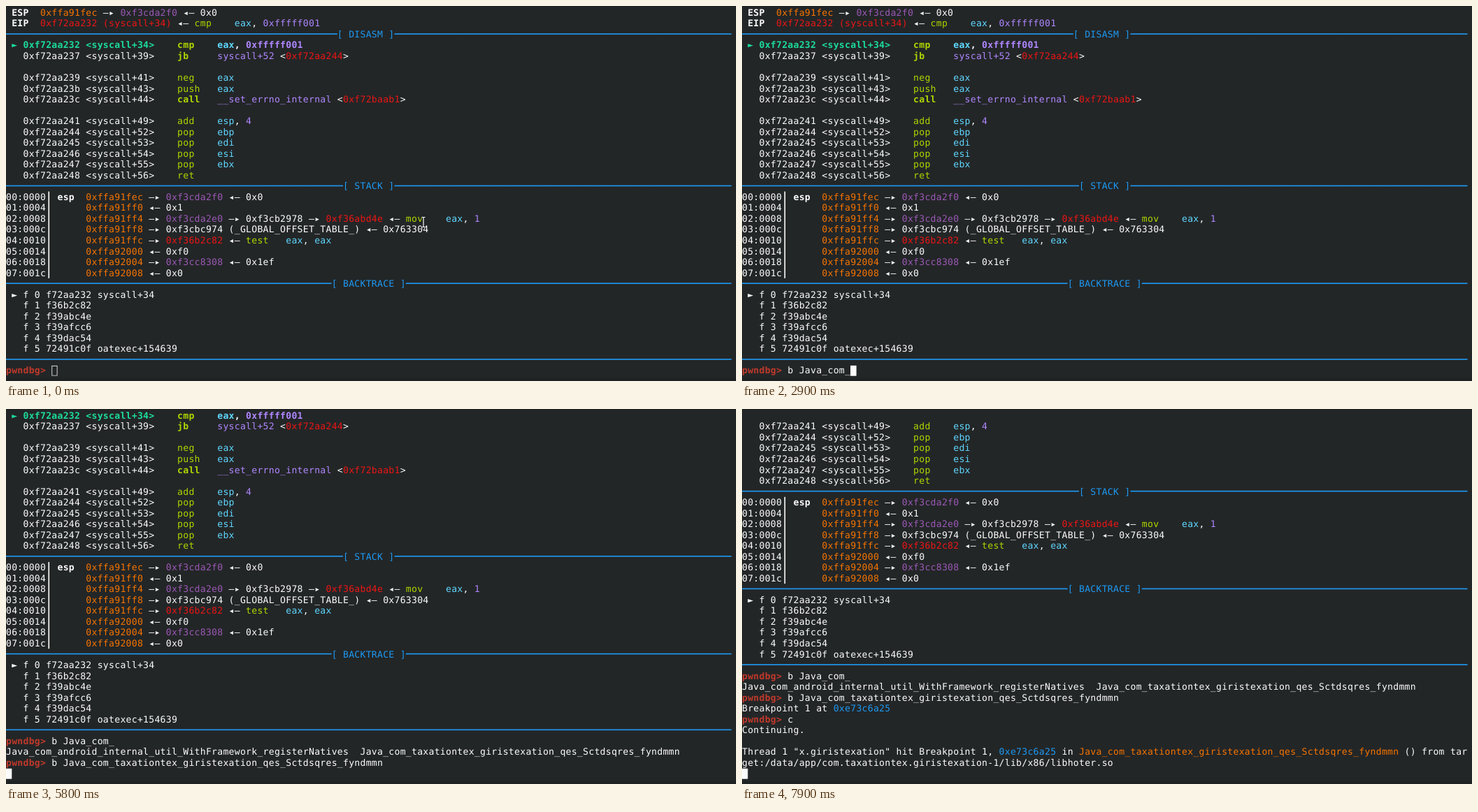
These frames come from a looping animation (1044 by 537 pixels, 8 s). An HTML page:

```html
<!DOCTYPE html>
<html lang="en">
<head>
<meta charset="utf-8">
<title>pwndbg session</title>
<style>
  html, body { margin: 0; width: 100%; height: 100%; overflow: hidden; background: #232627; }
  body { position: relative; box-shadow: inset 0 1px #1d2021, inset 0 -4px #1f2223; }

  /* Terminal window of 1278 x 657 px with 10 x 19 px cells, reduced to the stage */
  #term {
    position: absolute; left: 0; top: 0; width: 1278px; height: 657px;
    overflow: hidden; transform: scale(calc(1044 / 1278), calc(537 / 657)); transform-origin: 0 0;
    font: 16px/19px "DejaVu Sans Mono", monospace; color: #fcfcfc;
    letter-spacing: calc(10px - 1ch);
    text-rendering: geometricPrecision; font-variant-ligatures: none;
  }
  #screen { position: absolute; left: 0; top: 2px; width: 1278px; height: 646px; overflow: hidden; }
  #log { position: absolute; left: 0; margin: 0; font: inherit; white-space: pre; }
  #log i { font-style: normal; }
  .o { color: #f67400; }
  .p { color: #9b59b6; }
  .r { color: #ed1515; }
  .u { color: #1d99f3; }
  .t { color: #1cdc9a; }
  .g { color: #afd700; }
  .c { color: #5fd7ff; }
  .v { color: #af87ff; }
  .ps { color: #c0392b; }

  .rule {
    display: inline-block; position: relative; vertical-align: top;
    width: 1270px; height: 19px; color: #1d99f3;
    background: linear-gradient(#1d99f3, #1d99f3) 0 8px / 100% 2px no-repeat;
  }
  .rule span { position: absolute; top: 0; background: #232627; }
  .bar { position: absolute; left: 74px; top: 323px; width: 2px; height: 152px; background: #fcfcfc; }
  .type { display: inline-block; vertical-align: top; height: 19px; overflow: hidden; }
  #cursor {
    position: absolute; top: 628px; width: 10px; height: 18px;
    box-sizing: border-box; border: 1px solid #fcfcfc;
  }
  #mouse { position: absolute; left: 592px; top: 301px; }

  #log, #cursor, #mouse, .type, #hit { animation: 8s -4ms step-end infinite; }
  #log { animation-name: scroll; }
  #cursor { animation-name: move, focus; }
  #mouse { animation-name: mouse; }
  #cmd1 { animation-name: cmd1; }
  #cmd2 { animation-name: cmd2; }
  #cmd3 { animation-name: cmd3; }
  #hit { animation-name: hit; }

  @keyframes scroll {
    0% { top: 0; }
    51.25% { top: -38px; }
    72.5% { top: -57px; }
    73.75% { top: -76px; }
    98.75%, 100% { top: -171px; }
  }
  @keyframes move {
    0% { left: 80px; }
    17.5% { left: 90px; }
    18.75% { left: 100px; }
    21.25% { left: 110px; }
    25% { left: 120px; }
    27.5% { left: 130px; }
    31.25% { left: 150px; }
    32.5% { left: 170px; }
    36.25% { left: 190px; }
    58.75% { left: 200px; }
    65% { left: 670px; }
    72.5% { left: 0; }
    73.75% { left: 80px; }
    81.25% { left: 90px; }
    98.75%, 100% { left: 0; }
  }
  @keyframes focus {
    0% { background: transparent; }
    8.75%, 100% { background: #fcfcfc; }
  }
  @keyframes mouse {
    0% { transform: none; visibility: visible; }
    6.25% { transform: translate(-18px, 12px); visibility: visible; }
    7.5% { transform: translate(-45px, 28px); visibility: visible; }
    17.5%, 100% { transform: translate(-45px, 28px); visibility: hidden; }
  }
  @keyframes cmd1 {
    0% { width: 0; }
    17.5% { width: 10px; }
    18.75% { width: 20px; }
    21.25% { width: 30px; }
    25% { width: 40px; }
    27.5% { width: 50px; }
    31.25% { width: 70px; }
    32.5% { width: 90px; }
    36.25%, 100% { width: 110px; }
  }
  @keyframes cmd2 {
    0% { width: 110px; }
    58.75% { width: 120px; }
    65%, 100% { width: 590px; }
  }
  @keyframes cmd3 {
    0% { width: 0; }
    81.25%, 100% { width: 10px; }
  }
  @keyframes hit {
    0% { visibility: hidden; }
    73.75%, 100% { visibility: visible; }
  }
</style>
</head>
<body>
<div id="term"><div id="screen">
<pre id="log"> <b>ESP</b>  <i class="o">0xffa91fec</i> —▸ <i class="p">0xf3cda2f0</i> ◂— 0x0
 <b>EIP</b>  <i class="r">0xf72aa232 (syscall+34)</i> ◂— <i class="g">cmp</i>    <i class="c">eax</i>, <i class="v">0xfffff001</i>
<span class="rule"><span style="left:580px">[ DISASM ]</span></span>
<b> <i class="t">► 0xf72aa232 &lt;syscall+34&gt;</i>    <i class="g">cmp</i>    <i class="c">eax</i>, <i class="v">0xfffff001</i></b>
   0xf72aa237 &lt;syscall+39&gt;    <b class="g">jb</b>     <i class="v">syscall+52</i> &lt;<i class="r">0xf72aa244</i>&gt;

   0xf72aa239 &lt;syscall+41&gt;    <i class="g">neg</i>    <i class="c">eax</i>
   0xf72aa23b &lt;syscall+43&gt;    <i class="g">push</i>   <i class="c">eax</i>
   0xf72aa23c &lt;syscall+44&gt;    <b class="g">call</b>   <i class="v">__set_errno_internal</i> &lt;<i class="r">0xf72baab1</i>&gt;

   0xf72aa241 &lt;syscall+49&gt;    <i class="g">add</i>    <i class="c">esp</i>, <i class="v">4</i>
   0xf72aa244 &lt;syscall+52&gt;    <i class="g">pop</i>    <i class="c">ebp</i>
   0xf72aa245 &lt;syscall+53&gt;    <i class="g">pop</i>    <i class="c">edi</i>
   0xf72aa246 &lt;syscall+54&gt;    <i class="g">pop</i>    <i class="c">esi</i>
   0xf72aa247 &lt;syscall+55&gt;    <i class="g">pop</i>    <i class="c">ebx</i>
   0xf72aa248 &lt;syscall+56&gt;    <i class="g">ret</i>
<span class="rule"><span style="left:590px">[ STACK ]</span></span>
00:0000  <b>esp</b>  <i class="o">0xffa91fec</i> —▸ <i class="p">0xf3cda2f0</i> ◂— 0x0
01:0004       <i class="o">0xffa91ff0</i> ◂— 0x1
02:0008       <i class="o">0xffa91ff4</i> —▸ <i class="p">0xf3cda2e0</i> —▸ 0xf3cb2978 —▸ <i class="r">0xf36abd4e</i> ◂— <i class="g">mov</i>    <i class="c">eax</i>, <i class="v">1</i>
03:000c       <i class="o">0xffa91ff8</i> —▸ 0xf3cbc974 (_GLOBAL_OFFSET_TABLE_) ◂— 0x763304
04:0010       <i class="o">0xffa91ffc</i> —▸ <i class="r">0xf36b2c82</i> ◂— <i class="g">test</i>   <i class="c">eax</i>, <i class="c">eax</i>
05:0014       <i class="o">0xffa92000</i> ◂— 0xf0
06:0018       <i class="o">0xffa92004</i> —▸ <i class="p">0xf3cc8308</i> ◂— 0x1ef
07:001c       <i class="o">0xffa92008</i> ◂— 0x0
<span class="rule"><span style="left:570px">[ BACKTRACE ]</span></span>
 ► f 0 f72aa232 syscall+34
   f 1 f36b2c82
   f 2 f39abc4e
   f 3 f39afcc6
   f 4 f39dac54
   f 5 72491c0f oatexec+154639
<span class="rule"></span>
<b class="ps">pwndbg&gt;</b> <span class="type" id="cmd1">b Java_com_</span>
Java_com_android_internal_util_WithFramework_registerNatives  Java_com_taxationtex_giristexation_qes_Sctdsqres_fyndmmn
<b class="ps">pwndbg&gt;</b> <span class="type" id="cmd2">b Java_com_taxationtex_giristexation_qes_Sctdsqres_fyndmmn</span>
<span id="hit">Breakpoint 1 at <i class="u">0xe73c6a25</i></span>
<b class="ps">pwndbg&gt;</b> <span class="type" id="cmd3">c</span>
Continuing.

Thread 1 "x.giristexation" hit Breakpoint 1, <i class="u">0xe73c6a25</i> in <i class="o">Java_com_taxationtex_giristexation_qes_Sctdsqres_fyndmmn</i> () from tar
get:/data/app/com.taxationtex.giristexation-1/lib/x86/libhoter.so
<span class="bar"></span></pre>
<div id="cursor"></div>
</div></div>
<svg id="mouse" width="10" height="18" fill="none">
  <path d="M2.5 1.5H7.5M5 1.5V15.5M2.5 15.5H7.5" stroke="#232627" stroke-width="2.4"/>
  <path d="M2.5 1.5H7.5M5 1.5V15.5M2.5 15.5H7.5" stroke="#fcfcfc" stroke-width="1.2"/>
</svg>
</body>
</html>
```
